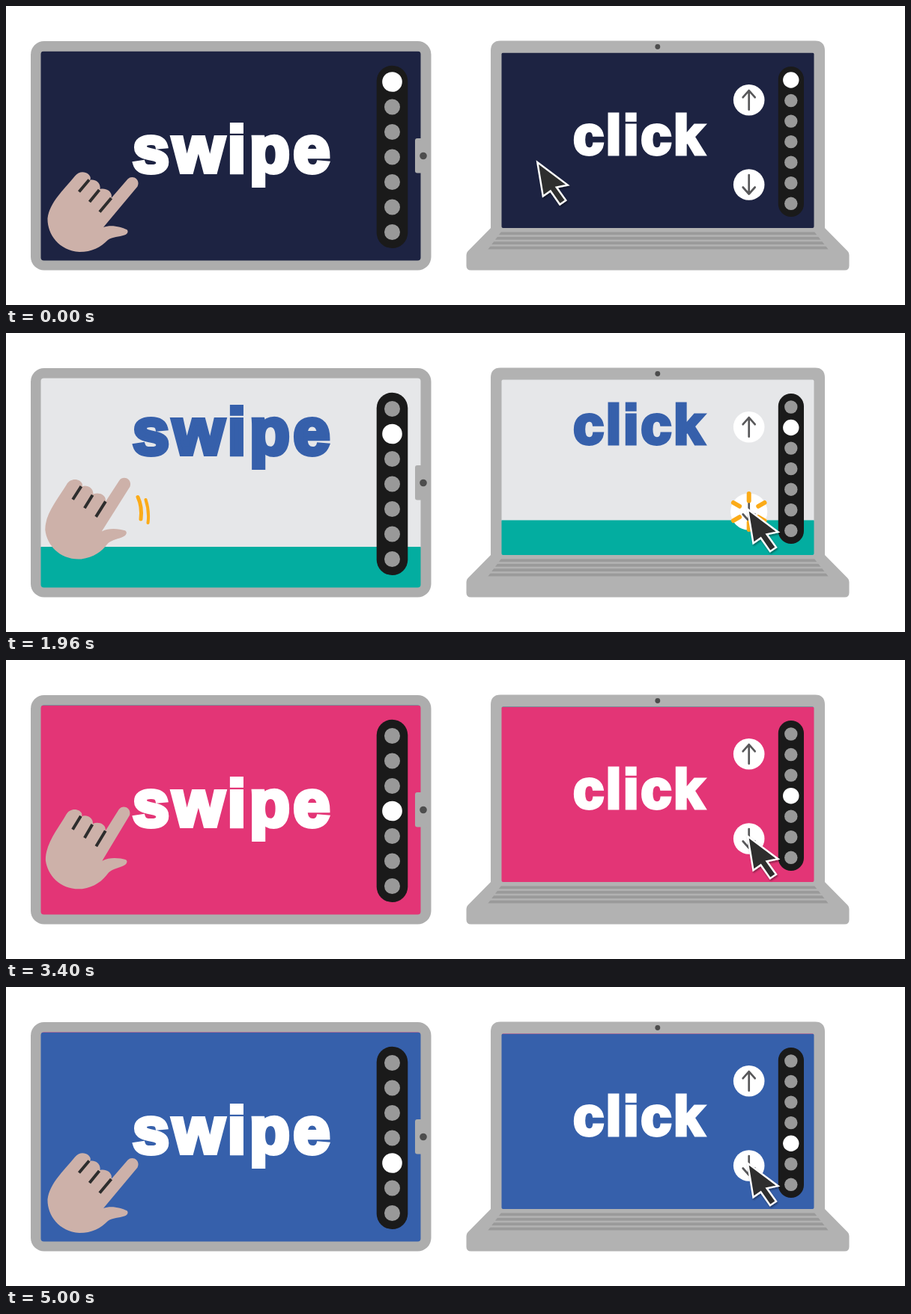
Write an HTML page that moves like this. It is 1200x400 px and loops after 6 s.

```html
<!DOCTYPE html>
<html lang="en">
<head>
<meta charset="utf-8">
<title>Swipe and click</title>
<style>
  html, body { margin: 0; width: 100%; height: 100%; overflow: hidden; background: #fff; }
  svg { display: block; width: 1200px; height: 400px; }
  text { font-family: "Liberation Sans", Arial, sans-serif; font-weight: 700; stroke-linejoin: miter; stroke-miterlimit: 3; }
</style>
</head>
<body>
<svg id="stage" viewBox="0 0 1200 400" xmlns="http://www.w3.org/2000/svg">
  <defs>
    <clipPath id="tabletClip"><rect x="46.5" y="60.5" width="507" height="280" rx="4"/></clipPath>
    <clipPath id="laptopClip"><rect x="661.5" y="62.5" width="417" height="234.5" rx="2"/></clipPath>
    <clipPath id="keysClip"><path d="M661 302H1079L1098 326H643Z"/></clipPath>
    <filter id="shadow" x="-30%" y="-30%" width="170%" height="170%">
      <feDropShadow dx="1" dy="2" stdDeviation="1.3" flood-color="#000" flood-opacity=".4"/>
    </filter>
    <g id="arrow" fill="none" stroke="#58585a" stroke-width="2.7" stroke-linecap="round" stroke-linejoin="round">
      <path d="M0 13V-12.5M-8 -3.5L0 -12.5L8 -3.5"/>
    </g>
  </defs>

  <!-- tablet -->
  <rect x="33" y="47" width="534.5" height="306.5" rx="18" fill="#adadad"/>
  <g clip-path="url(#tabletClip)"><g id="tabletPages"></g></g>
  <rect x="546" y="177" width="18" height="46.5" rx="3" fill="#adadad"/>
  <circle cx="557" cy="200.5" r="4.8" fill="#4d4d4d"/>
  <rect x="494.7" y="79.7" width="41.6" height="244.3" rx="20.8" fill="#1a1a1a"/>
  <g id="tabletDots"></g>

  <!-- laptop -->
  <path fill="#b2b2b2" d="M647 297V60Q647 46.5 660 46.5H1080Q1093 46.5 1093 60V297L1123.500 328Q1125.500 330 1125.500 333V347.500Q1125.500 353.500 1119.500 353.500H620.500Q614.500 353.500 614.500 347.500V333Q614.500 330 616.500 328Z"/>
  <circle cx="869.8" cy="54.5" r="3.4" fill="#4d4d4d"/>
  <g id="keys" clip-path="url(#keysClip)" fill="#9a9a9a"></g>
  <g clip-path="url(#laptopClip)"><g id="laptopPages"></g></g>
  <rect x="1030.800" y="81" width="34.200" height="201" rx="17.100" fill="#1a1a1a"/>
  <g id="laptopDots"></g>
  <g transform="translate(991.7 125.7)">
    <circle r="20.8" fill="#fff"/><use href="#arrow"/>
  </g>
  <g transform="translate(991.7 239)">
    <circle id="button" r="20.8" fill="#fff"/><use href="#arrow" transform="scale(1 -1)"/>
    <g id="burst" stroke="#fbab18" stroke-width="6" stroke-linecap="round"></g>
  </g>
  <path id="cursor" d="M0 0L7.500 45.500L17.500 38.500L30 56.500L38 51L25.500 33.500L40.500 30.500Z"
        fill="#2f2f2f" stroke="#fff" stroke-width="2.4" stroke-linejoin="miter" filter="url(#shadow)"/>

  <!-- hand -->
  <g id="marks" fill="none" stroke="#fbab18" stroke-linecap="round">
    <path pathLength="1" stroke-width="5" d="M176 219.500Q182 232 180 249"/>
    <path pathLength="1" stroke-width="4" d="M186.500 223Q191.500 238 189.500 254"/>
  </g>
  <g id="hand">
    <path fill="#cdb1a9" d="M162.500 231.500C169 225 180 232 175.500 241.500L130 296C141 292 154 296 161 299C164 301 162.500 305 158 306.500C151 309 142 308.500 136 313C126 323 115 329 98 329C70 327 55 305 55.500 284C58 262 79 244 92 227.500C97 221 105 221 110 225C113 228 113.500 231 112 233C118 231 127 236 125.500 245C133 243 143 248 140.500 257Z"/>
    <path fill="none" stroke="#2d2d2d" stroke-width="4" d="M97.500 248.500L111 232.500M111.500 262L124.500 246M125 275.500L140.500 257"/>
  </g>
</svg>

<script>
  const LOOP = 6000, FRAME = 40;
  const PAGES = ["#1d2342", "#e6e7e9", "#03ada0", "#e33576", "#3660ab"];
  const SCROLLS = [862, 1860, 2861, 3864]; // start of each page change
  const SCROLL_MS = 340;

  const $ = id => document.getElementById(id);
  const clamp = x => Math.min(1, Math.max(0, x));
  const ease = x => x * x * (3 - 2 * x);
  const ramp = (t, from, to) => ease(clamp((t - from) / (to - from)));

  function add(parent, tag, attrs) {
    const el = document.createElementNS("http://www.w3.org/2000/svg", tag);
    for (const name in attrs) el.setAttribute(name, attrs[name]);
    return parent.appendChild(el);
  }

  const devices = [
    { pages: $("tabletPages"), dots: $("tabletDots"), word: "swipe",
      x: 46, y: 60.5, w: 509, step: 285,
      textX: 169, textY: 221.5, size: 88, stroke: 6, gap: 4.7,
      dotX: 515.5, dotY: 101.5, dotStep: 33.5, small: 10.5, big: 13.3, extra: 2.2 },
    { pages: $("laptopPages"), dots: $("laptopDots"), word: "click",
      x: 661, y: 62.5, w: 419, step: 237.5,
      textX: 757.5, textY: 197.8, size: 72, stroke: 5, gap: 3.4,
      dotX: 1047.8, dotY: 99, dotStep: 27.55, small: 8.7, big: 10.7, extra: 2.1 }
  ];

  for (const d of devices) {
    PAGES.forEach((color, i) => {
      const shift = i * d.step, ink = i === 1 ? PAGES[4] : "#fff";
      add(d.pages, "rect", { x: d.x, y: d.y + shift, width: d.w, height: d.step + 1, fill: color });
      add(d.pages, "text", {
        x: d.textX, y: d.textY + shift, fill: ink, stroke: ink,
        "font-size": d.size, "stroke-width": d.stroke, "letter-spacing": d.gap
      }).textContent = d.word;
    });
    d.circles = Array.from({ length: 7 }, (_, i) =>
      add(d.dots, "circle", { cx: d.dotX, cy: d.dotY + i * d.dotStep }));
  }

  for (let i = 0; i < 4; i++) add($("keys"), "rect", { x: 640, y: 302.4 + i * 6.4, width: 460, height: 3.8 });

  const rays = Array.from({ length: 6 }, (_, i) => {
    const a = (i * 60 - 90) * Math.PI / 180;
    return { x: Math.cos(a), y: Math.sin(a), el: add($("burst"), "line", {}) };
  });

  function drawDots(d, t) {
    d.circles.forEach((dot, i) => {
      const start = SCROLLS[i - 1], end = SCROLLS[i];
      const on = i === 0 ? 1 : start ? ramp(t, start + 190, start + 340) : 0;
      const off = end ? ramp(t, end + 190, end + 330) : 0;
      const lit = on - off;
      const pop = start ? on - ramp(t, start + 340, start + 560) : 0;
      const tone = Math.round(153 + 102 * lit);
      dot.setAttribute("r", d.small + (d.big - d.small) * lit + d.extra * pop);
      dot.setAttribute("fill", `rgb(${tone},${tone},${tone})`);
    });
  }

  function drawHand(t) {
    let lift = 0, turn = 0, mark = 0, fade = 0;
    for (let c = 0; c < 4; c++) {
      const s = t - c * 1000;
      const back = ramp(s, 1210, 1640);
      lift += ramp(s, 640, 1150) - back;
      turn += ramp(s, 700, 1210) - back;
      mark += ramp(s, 840, 950) - ramp(s, 1130, 1170);
      fade += ramp(s, 1010, 1130) - ramp(s, 1130, 1170);
    }
    $("hand").setAttribute("transform",
      `translate(${-5 * lift} ${-38 * lift}) rotate(${-15 * turn} 98 285)`);
    $("marks").setAttribute("opacity", mark > 0.02 ? 1 - fade : 0);
    $("marks").setAttribute("stroke-dasharray", mark > 0.98 ? "none" : `${mark} 2`);
  }

  function drawClick(t) {
    let press = 0, out = 0;
    for (let c = 0; c < 4; c++) {
      const s = t - c * 1000;
      press += ramp(s, 840, 950) - ramp(s, 1000, 1140);
      out += ramp(s, 1000, 1120) - ramp(s, 1140, 1180);
    }
    const move = ramp(t, 0, 800);
    $("cursor").setAttribute("transform", `translate(${709.3 + 280.7 * move} ${209 + 26.7 * move})`);
    $("button").setAttribute("r", 20.8 + 3.8 * press);
    $("burst").setAttribute("opacity", press > 0.05 ? 1 - out : 0);
    const inner = 14.5 + 8 * out, outer = 14.5 + 9.5 * press;
    for (const r of rays) {
      const far = Math.max(inner, outer);
      r.el.setAttribute("x1", r.x * inner);
      r.el.setAttribute("y1", r.y * inner);
      r.el.setAttribute("x2", r.x * far);
      r.el.setAttribute("y2", r.y * far);
    }
  }

  function draw(t) {
    const page = SCROLLS.reduce((sum, s) => sum + ramp(t, s, s + SCROLL_MS), 0);
    for (const d of devices) {
      d.pages.setAttribute("transform", `translate(0 ${-page * d.step})`);
      drawDots(d, t);
    }
    drawHand(t);
    drawClick(t);
  }

  const begin = performance.now();
  function tick() {
    const t = (performance.now() - begin) % LOOP;
    draw(Math.floor(t / FRAME) * FRAME);
    requestAnimationFrame(tick);
  }
  tick();
</script>
</body>
</html>
```
